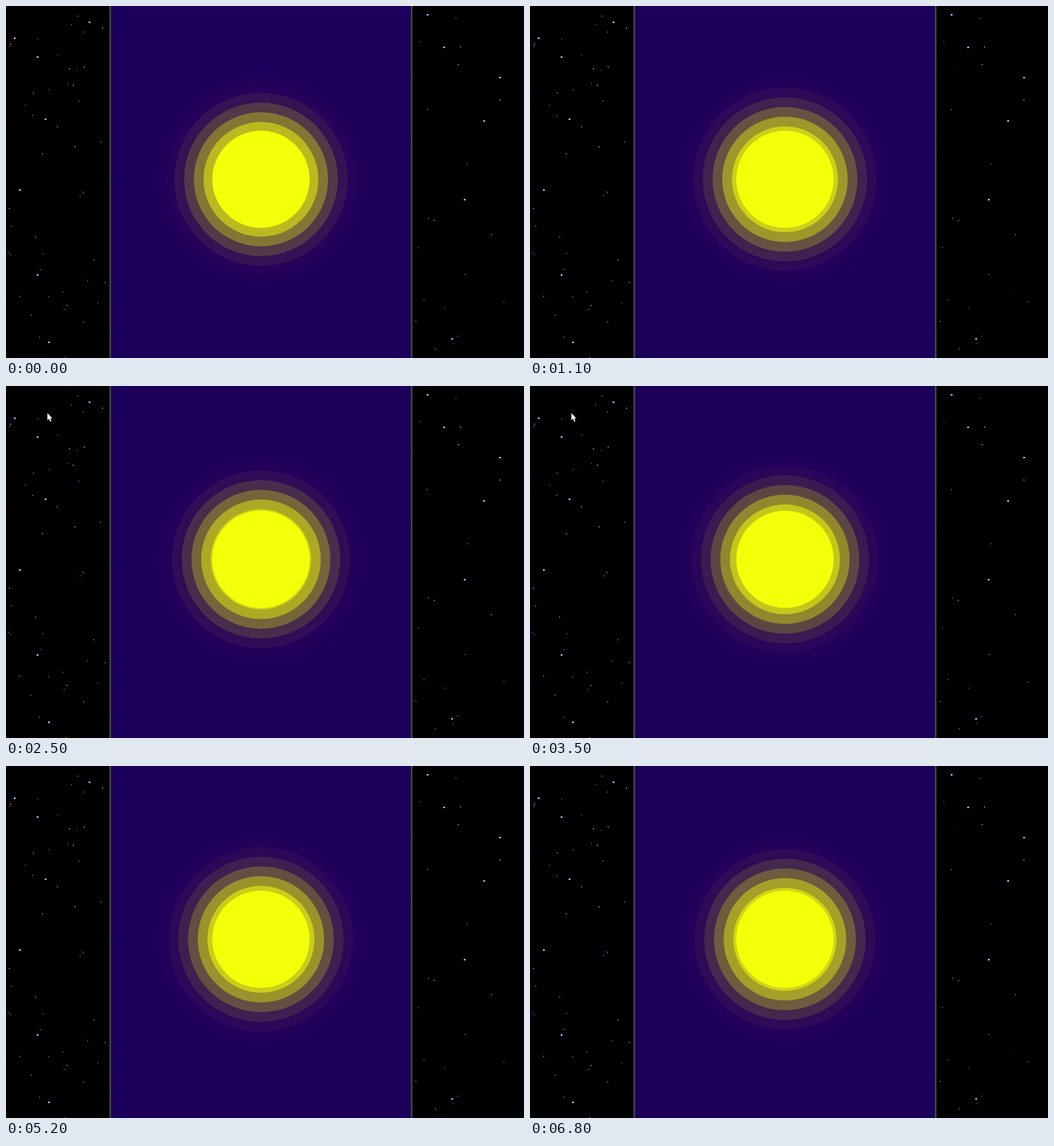
An HTML page with a canvas that plays this animation: 907x617 px, repeating every 6.9 s.

```html
<!DOCTYPE html>
<html lang="en">
<head>
<meta charset="utf-8">
<title>Pulsing sun</title>
<style>
  html, body { margin: 0; width: 100%; height: 100%; overflow: hidden; background: #000; }
  canvas { display: block; }
</style>
</head>
<body>
<canvas id="stage" width="907" height="617"></canvas>
<script>
const W = 907, H = 617, LOOP = 6900, STEP = 100;
const CX = 446.4, CY = 303.8, SUN = 85.2;
const GAP = 17, RINGS = 5, DELAY = 2000, PHASE = .9;
const PANEL = 262.5, BORDER = 2.8;
const YELLOW = '#f4ff0a';
const ctx = document.getElementById('stage').getContext('2d');

// Brightest stars; the rest are scattered at random
const landmarks = [[15, 56], [146, 28], [55, 89], [69, 198], [24, 322], [55, 471], [75, 589],
  [738, 15], [767, 72], [865, 125], [837, 201], [803, 339], [781, 583]];

// Pointer tip: [ms, x, y]
const path = [[1200, 80, 15], [1700, 73, 57], [2200, 72, 47], [3500, 72, 47], [4400, 59, 12]];

const ringAlpha = age => .58 * Math.exp(-((age / .5) ** 1.7)) * (1 - age ** 16);

function disc(c, r, fill, alpha = 1) {
  c.globalAlpha = alpha;
  c.fillStyle = fill;
  c.beginPath();
  c.arc(CX, CY, r, 0, Math.PI * 2);
  c.fill();
  c.globalAlpha = 1;
}

function drawSky(c) {
  let seed = 11;
  const rnd = () => (seed = seed * 16807 % 2147483647) / 2147483647;
  const dot = (x, y, w, h, color) => {
    c.fillStyle = color;
    c.fillRect(x, y, w, h);
  };
  const anywhere = leftShare => [
    Math.floor(rnd() < leftShare ? rnd() * 180 : 713 + rnd() * 194),
    Math.floor(rnd() * H)
  ];
  dot(0, 0, W, H, '#000');
  for (let i = 0; i < 300; i++) {
    const v = 8 + Math.floor(rnd() * 20);
    dot(...anywhere(.5), 1, 1, `rgb(${v},${v},${v})`);
  }
  for (let i = 0; i < 64; i++) {
    const [x, y] = anywhere(.62);
    const hue = rnd() < .6 ? 240 : 35;
    dot(x, y, 2, 2, `hsl(${hue},45%,${20 + rnd() * 20}%)`);
    dot(x, y, 1, 1, `hsl(${hue},60%,${60 + rnd() * 25}%)`);
  }
  for (const [x, y] of landmarks) {
    dot(x - 2, y - 1, 4, 3, '#2a2a9c');
    dot(x - 1, y - 1, 2, 3, '#8c8cf0');
    dot(x - 1, y, 3, 1, '#fff');
  }
}

function drawPanel(c) {
  const bar = (half, color) => {
    c.fillStyle = color;
    c.fillRect(CX - half, 0, half * 2, H);
  };
  bar(PANEL + BORDER, '#464642');
  bar(PANEL, '#1a005b');
  const glow = c.createRadialGradient(CX, CY, 0, CX, CY, 200);
  for (const [p, a] of [[0, .025], [.6, .025], [.77, .05], [.92, .015], [1, 0]]) {
    glow.addColorStop(p, `rgba(255,0,85,${a})`);
  }
  disc(c, 200, glow);
}

function drawPointer(t) {
  const next = path.findIndex(p => p[0] > t);
  if (next < 1) return;
  const [t0, x0, y0] = path[next - 1], [t1, x1, y1] = path[next];
  const k = (t - t0) / (t1 - t0);
  ctx.save();
  ctx.translate(x0 + (x1 - x0) * k + .5, y0 + (y1 - y0) * k + .5);
  ctx.lineWidth = 1.5;
  ctx.strokeStyle = '#000';
  ctx.fillStyle = '#fff';
  const arrow = new Path2D('M0 0V12.5L2.8 10L5 15L7 14.2L5 9.3H8.8Z');
  ctx.stroke(arrow);
  ctx.fill(arrow);
  ctx.restore();
}

const backdrop = document.createElement('canvas');
backdrop.width = W;
backdrop.height = H;
drawSky(backdrop.getContext('2d'));
drawPanel(backdrop.getContext('2d'));

function draw(t) {
  ctx.drawImage(backdrop, 0, 0);
  const shift = (PHASE + t / DELAY) % 1;
  for (let i = RINGS - 1; i >= 0; i--) {
    disc(ctx, SUN + GAP * (i + shift), YELLOW, ringAlpha((i + shift) / RINGS));
  }
  disc(ctx, SUN, YELLOW);
  drawPointer(t);
}

const start = performance.now();
function tick() {
  const t = (performance.now() - start) % LOOP;
  draw(Math.floor(t / STEP) * STEP);
  requestAnimationFrame(tick);
}
tick();
</script>
</body>
</html>
```
